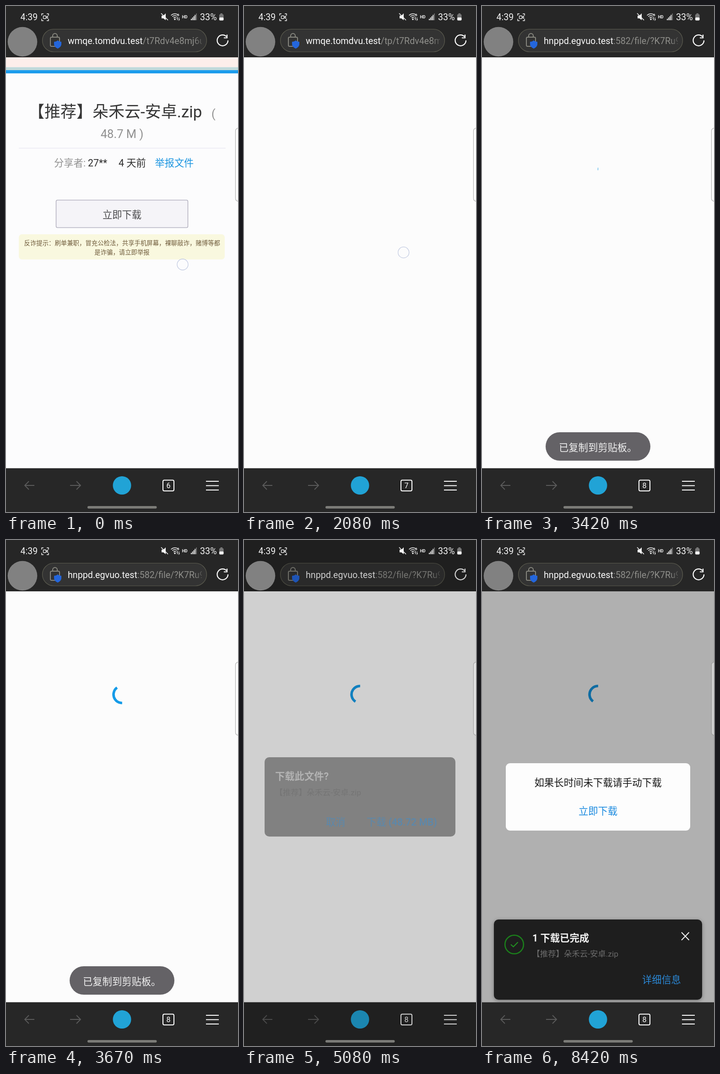
Recreate the animation shown at these times as an HTML page with a canvas. Size 507 px wide and 1104 px high, loop 8510 ms.

```html
<!DOCTYPE html>
<html lang="zh-CN">
<head>
<meta charset="utf-8">
<title>Download</title>
<style>
html, body { margin: 0; width: 100%; height: 100%; overflow: hidden; background: #fcfcfc; }
canvas { display: block; width: 100vw; height: 100vh; }
</style>
</head>
<body>
<canvas id="stage" width="507" height="1104"></canvas>
<script>
const c = document.getElementById('stage').getContext('2d');
const LOOP = 8510, STEP = 1000 / 12;
const W = 507, H = 1104, TOP = 112, BOTTOM = 1008.5;
const FONT = 'Roboto, "Noto Sans CJK SC", "Noto Sans CJK", sans-serif';
const FILE = '【推荐】朵禾云-安卓.zip';
const URLS = [
  ['wmqe.tomdvu.test', '/t7Rdv4e8mj6u'],
  ['wmqe.tomdvu.test', '/tp/t7Rdv4e8mj6u'],
  ['hnppd.egvuo.test', ':582/file/?K7Ru9']
];
// when each new tab starts to open, the tap point, and when the toolbar follows
const OPENINGS = [
  { at: 1266, x: 345, y: 461, bar: 1340, loaded: 1920 },
  { at: 2934, x: 358, y: 732, bar: 3050, loaded: 3370 }
];
const OPEN_TIME = 300, TAB_HEIGHT = 1084;

const clamp = v => Math.max(0, Math.min(1, v));
const ramp = (t, a, b) => clamp((t - a) / (b - a));
const smooth = u => u * u * (3 - 2 * u);
const mix = (a, b, u) => a + (b - a) * u;

function rect(x, y, w, h, color) {
  c.fillStyle = color;
  c.fillRect(x, y, w, h);
}

function box(x, y, w, h, r, fill, stroke, lw = 1) {
  c.beginPath();
  c.roundRect(x, y, w, h, r);
  if (fill) { c.fillStyle = fill; c.fill(); }
  if (stroke) { c.strokeStyle = stroke; c.lineWidth = lw; c.stroke(); }
}

function disc(x, y, r, color) {
  c.beginPath();
  c.arc(x, y, r, 0, 7);
  c.fillStyle = color;
  c.fill();
}

function ring(x, y, r, color, lw, from = 0, to = Math.PI * 2) {
  c.beginPath();
  c.arc(x, y, r, from, to);
  c.strokeStyle = color;
  c.lineWidth = lw;
  c.stroke();
}

// each path is a flat list: x, y, x, y ...
function lines(color, lw, ...paths) {
  c.strokeStyle = color;
  c.lineWidth = lw;
  c.beginPath();
  for (const p of paths) {
    c.moveTo(p[0], p[1]);
    for (let i = 2; i < p.length; i += 2) c.lineTo(p[i], p[i + 1]);
  }
  c.stroke();
}

function text(str, x, y, size, color, weight = 400, align = 'left') {
  c.font = `${weight} ${size}px ${FONT}`;
  c.textAlign = align;
  c.fillStyle = color;
  c.fillText(str, x, y);
}

function faded(alpha, draw) {
  if (alpha <= 0) return;
  c.save();
  c.globalAlpha = alpha;
  draw();
  c.restore();
}

function filePage() {
  rect(0, TOP, W, BOTTOM - TOP, '#fcfcfd');
  rect(0, TOP, W, 21.5, '#fdeeeb');
  rect(0, 133.5, W, 7, '#c0d9db');
  rect(0, 140, W, 7, '#1c9cec');
  text(FILE, 49, 243, 35, '#353535');
  text('(', 449, 244, 25.5, '#909090');
  text('48.7 M )', 253.5, 288, 25.5, '#909090', 400, 'center');
  rect(28, 309.5, 452, 1.5, '#ebe9f3');
  text('分享者:', 105, 350, 21.3, '#909090');
  text('27**', 179, 350, 21.3, '#2c2c2c');
  text('4 天前', 246, 350, 21.3, '#2c2c2c');
  text('举报文件', 325.5, 350, 21.2, '#1b95e0');
  box(109.5, 423.5, 288, 60, 3, '#f5f4f8', '#b5b3c1', 1.6);
  text('立即下载', 253.5, 463, 21.3, '#4a4a4c', 400, 'center');
  box(28, 498, 450, 55, 7, '#f9f8df');
  text('反诈提示：刷单兼职，冒充公检法，共享手机屏幕，裸聊敲诈，赌博等都', 39.5, 521.5, 13.4, '#705c3c');
  text('是诈骗，请立即举报', 253.5, 542, 13.4, '#705c3c', 400, 'center');
}

function openingTab(t, o) {
  const u = ramp(t, o.at, o.at + OPEN_TIME);
  if (u <= 0 || u >= 1) return;
  const s = smooth(u), w = W * s, h = TAB_HEIGHT * s;
  const x = o.x * (1 - s), y = TOP + o.y * (1 - s);
  faded(s, () => {
    for (let i = 1; i < 5; i++) box(x, y, w, h, 2, null, 'rgba(110,110,130,.05)', i * 4);
  });
  faded(s * s * s, () => rect(x, y, w, h, '#fcfcfc'));
  faded(s, () => rect(x, y + h - 38 * s, w, 38 * s, '#222'));
}

function spinner(t) {
  if (t < 3400) return;
  const tail = t < 4417 ? -88 + (t - 3417) * 0.57 : 122 + (t - 4417) * 0.541;
  const a = tail * Math.PI / 180;
  c.save();
  c.beginPath();
  c.rect(225, 310, 28.8, 55);
  c.clip();
  ring(253.5, 337, 18.5, '#159be8', 5.6, a, a + Math.PI);
  c.restore();
}

function pointer(t) {
  const a = smooth(ramp(t, 250, 1050)), b = smooth(ramp(t, 1750, 2700));
  const x = mix(mix(386, 345, a), 358, b);
  const y = mix(mix(564, 461, a), 732, b);
  faded(1 - ramp(t, 3080, 3300), () => ring(x, y, 12, '#c4cce2', 1.3));
}

function ripple(t) {
  const r = mix(30, 52, ramp(t, 2850, 3000));
  faded(ramp(t, 2830, 2950) * (1 - ramp(t, 3010, 3230)), () => disc(355, 732, r, '#f5e1e2'));
}

function webDialog(t) {
  faded(ramp(t, 5160, 5290), () => {
    rect(0, TOP, W, BOTTOM - TOP, 'rgba(0,0,0,.3)');
    box(52, 487, 403, 147, 9, '#fdfdfd');
    text('如果长时间未下载请手动下载', 253.5, 537, 21.4, '#161616', 400, 'center');
    text('立即下载', 253.5, 599, 21.3, '#1a8adf', 400, 'center');
  });
}

function card(t) {
  const u = ramp(t, 5240, 5520);
  if (!u) return;
  const done = t >= 7500;
  c.save();
  c.translate(0, 190 * Math.pow(1 - u, 3));
  c.shadowColor = 'rgba(0,0,0,.35)';
  c.shadowBlur = 8;
  c.shadowOffsetY = 2;
  box(26, 828, 455, 175, 10, '#1e1e1e');
  c.shadowColor = 'transparent';
  if (done) {
    ring(70.5, 882.5, 20.3, '#1b801b', 2.6);
    lines('#219021', 2.2, [63, 882.5, 68.5, 887.5, 78.5, 877.5]);
  } else {
    ring(70.5, 882.5, 20.3, '#4a8db8', 2.6);
    lines('#2f6be0', 2, [71, 873, 71, 888], [65, 882, 71, 888, 77, 882], [64, 891.5, 78, 891.5]);
  }
  text(done ? '1 下载已完成' : '1 正在下载...', 110, 876, 21.3, '#f2f2f2', 700);
  text(FILE, 109.4, 909, 17.4, '#6b6b6b');
  text('详细信息', 350, 967, 21.2, '#2b88d6');
  lines('#f0f0f0', 2, [436, 856, 452.5, 873], [452.5, 856, 436, 873]);
  c.restore();
}

function toast(t) {
  faded(ramp(t, 3200, 3350) * (1 - ramp(t, 4270, 4570)), () => {
    box(139, 930, 229, 62, 31, '#646266');
    text('已复制到剪贴板。', 168, 971, 21.3, '#f0f0f0');
  });
}

function toolbar(t) {
  const tab = OPENINGS.filter(o => t >= o.bar).length;
  const loading = tab > 0 && t < OPENINGS[tab - 1].loaded;
  const [host, path] = URLS[tab];

  rect(0, 0, W, TOP, '#262626');
  box(79.5, 50.5, 359, 49.5, 24.7, '#333', '#5d5d50', 1.2);
  if (!loading) {
    box(97, 68, 20, 20, 2.5, null, '#87877f', 2);
    c.beginPath();
    c.moveTo(102, 68);
    c.lineTo(102, 65);
    c.arc(107, 65, 5, Math.PI, 0);
    c.lineTo(112, 68);
    c.stroke();
    c.beginPath();
    c.moveTo(113, 75);
    c.quadraticCurveTo(116, 78, 121, 78);
    c.lineTo(121, 84);
    c.quadraticCurveTo(120, 90, 113, 93);
    c.quadraticCurveTo(106, 90, 105, 84);
    c.lineTo(105, 78);
    c.quadraticCurveTo(110, 78, 113, 75);
    c.fillStyle = '#2466dc';
    c.fill();
  }

  c.save();
  c.beginPath();
  c.rect(85, 52, 343, 46);
  c.clip();
  const x = loading ? 90 : 135;
  text(host, x, 83, 19.7, '#fafafa');
  text(path, x + c.measureText(host).width, 83, 19.7, '#8f8f8b');
  c.restore();
  if (!loading) {
    const g = c.createLinearGradient(410, 0, 430, 0);
    g.addColorStop(0, 'rgba(51,51,51,0)');
    g.addColorStop(1, 'rgba(51,51,51,.8)');
    rect(410, 60, 20, 32, g);
  }

  if (loading) {
    lines('#fff', 2, [463, 65, 483.5, 85.5], [483.5, 65, 463, 85.5]);
    const o = OPENINGS[tab - 1];
    rect(0, 109.5, mix(0, W, Math.pow(ramp(t, o.bar, o.loaded), 1.4)), 2, '#2c4f9e');
  } else {
    ring(473.3, 75, 11.8, '#fff', 2.2, 0, 5.55);
    lines('#fff', 2.2, [483, 62.5, 483, 69.5, 476, 69.5]);
  }

  rect(0, BOTTOM, W, H - BOTTOM, '#272727');
  lines('#5b5b5b', 1.8, [62, 1046, 41, 1046], [50, 1037, 41, 1046, 50, 1055],
    [140, 1046, 163, 1046], [154, 1037, 163, 1046, 154, 1055]);
  disc(253.5, 1046, 20, '#21a3d6');
  box(343, 1034.5, 24, 23.5, 3, null, '#fff', 2);
  text(6 + tab, 355, 1052, 16, '#fff', 400, 'center');
  lines('#fff', 2, [437, 1037, 465, 1037], [437, 1046.5, 465, 1046.5], [437, 1056, 465, 1056]);
}

function downloadDialog(t) {
  faded(ramp(t, 4050, 4200) * (1 - ramp(t, 5000, 5150)), () => {
    rect(0, 0, W, H, 'rgba(0,0,0,.4)');
    box(45, 474, 417, 173, 10, '#1e1e1e');
    text('下载此文件?', 68, 523, 21.3, '#f2f2f2', 700);
    text(FILE, 67.4, 557, 17.4, '#666');
    text('取消', 179, 623, 21.2, '#2b90e2');
    text('下载 (48.72 MB)', 268, 623, 21.2, '#2b90e2', 500);
  });
}

function statusBar(t) {
  const white = '#f4f4f4';
  text('4:39', 31.5, 31, 19.5, white);
  lines(white, 1.4, [78, 21, 78, 17, 82, 17], [89, 17, 93, 17, 93, 21],
    [93, 28, 93, 32, 89, 32], [82, 32, 78, 32, 78, 28]);
  if (t < 1300 || t > 1700) {
    box(81.5, 21.5, 6, 6, 1, null, white, 1.3);
    lines(white, 1.3, [88, 24, 91, 22, 91, 27, 88, 25]);
  }

  c.fillStyle = white;
  c.beginPath();
  for (const [x, y] of [[340, 21], [344, 21], [349, 16], [349, 31], [344, 27], [340, 27]]) c.lineTo(x, y);
  c.fill();
  lines(white, 1.6, [339, 16, 354, 31]);

  for (const r of [4, 8, 12]) ring(369, 29, r, white, 1.5, -2.35, -0.95);
  disc(369, 29, 1.8, white);
  text('6', 374, 22, 8, white, 700);
  lines(white, 1.2, [374.5, 31, 374.5, 25, 373, 27], [378, 25, 378, 31, 379.5, 29]);
  text('HD', 384.5, 27, 9, white, 700);
  for (let i = 0; i < 5; i++) {
    const h = 3 + i * 2.9;
    rect(404 + i * 2.8, 31 - h, 1.8, h, i < 4 ? white : '#777');
  }
  text('33%', 424, 31, 19.8, white);
  box(466, 18, 9.5, 13.5, 2, '#767676');
  rect(468.5, 16, 4.5, 2, '#767676');
  box(466, 25, 9.5, 6.5, 2, white);
}

function draw(t) {
  const [first, second] = OPENINGS;
  c.clearRect(0, 0, W, H);
  if (t < first.at + OPEN_TIME) filePage();
  else rect(0, TOP, W, BOTTOM - TOP, '#fcfcfc');
  ripple(t);
  openingTab(t, first);
  openingTab(t, second);
  spinner(t);
  webDialog(t);
  card(t);
  toolbar(t);
  downloadDialog(t);
  toast(t);
  box(501.5, 266.5, 20, 159.5, 6, 'rgba(255,255,255,.4)', 'rgba(135,135,135,.65)', 1.2);
  statusBar(t);
  disc(36, 78, 32.3, '#818181');
  box(178, 1091, 151.5, 5.5, 2.7, '#7c7c78');
  pointer(t);
}

const start = performance.now();
function tick() {
  const t = (performance.now() - start) % LOOP;
  draw(Math.min(101, Math.floor((t + 5) / STEP)) * STEP);
  requestAnimationFrame(tick);
}
tick();
</script>
</body>
</html>
```
